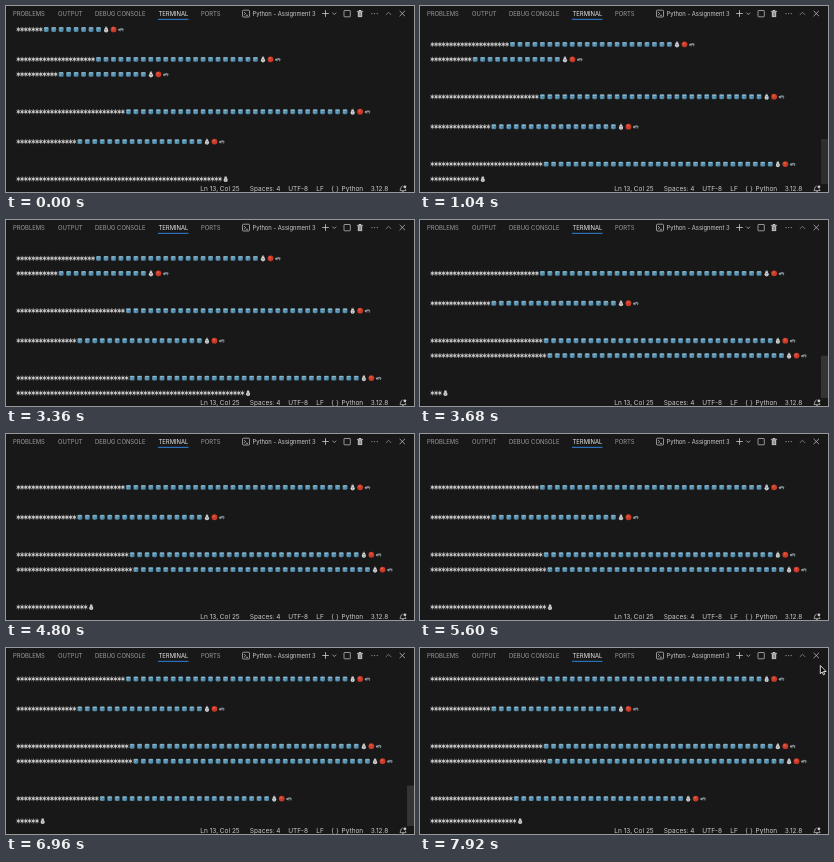
An HTML page with a canvas that plays this animation: 408 px wide and 186 px high, repeating every 8000 ms.

```html
<!DOCTYPE html>
<html lang="en">
<head>
<meta charset="utf-8">
<title>Terminal</title>
<style>
html, body { margin: 0; width: 100%; height: 100%; overflow: hidden; background: #181818; }
canvas { display: block; width: 408px; height: 186px; }
</style>
</head>
<body>
<canvas id="stage"></canvas>
<script>
const W = 408, H = 186, LOOP = 8000;
const CELL = 3.735, LINE = 7.48, LEFT = 10.5, BASE = 173;
const FG = '#cccccc', BG = '#181818';
const canvas = document.getElementById('stage');
const ctx = canvas.getContext('2d');
const scale = Math.max(1, window.devicePixelRatio || 1);
canvas.width = W * scale;
canvas.height = H * scale;

// A snowman walks 2 * flakes + 1 cells, then half the trail freezes
// and the next run begins `gap` lines further down.
const FIRST = 5, FIRST_END = 400;
const flakes = [7, 21, 11, 29, 16, 30, 31, 22, 22];
const gaps = [4, 2, 5, 4, 5, 2, 5, 3];
const pace = [67, 48, 69.5, 59]; // ms per cell, from run FIRST on

let line = 0, start = FIRST_END - (2 * flakes[FIRST] + 1) * pace[0];
const runs = flakes.map((n, i) => {
  const run = { n, line, start: -Infinity, step: pace[i - FIRST] };
  line += gaps[i];
  if (i >= FIRST) {
    run.start = start;
    start += (2 * n + 1) * run.step;
  }
  return run;
});

const clamp = v => Math.min(1, Math.max(0, v));

function dot(x, y, r, color) {
  ctx.fillStyle = color;
  ctx.beginPath();
  ctx.arc(x, y, r, 0, 7);
  ctx.fill();
}

function box(x, y, w, h, color) {
  ctx.fillStyle = color;
  ctx.fillRect(x, y, w, h);
}

function stroke(points, color = FG, width = 0.7) {
  ctx.strokeStyle = color;
  ctx.lineWidth = width;
  ctx.beginPath();
  points.forEach(([x, y]) => ctx.lineTo(x, y));
  ctx.stroke();
}

function frame(x, y, w, h, r) {
  ctx.strokeStyle = FG;
  ctx.lineWidth = 0.7;
  ctx.beginPath();
  ctx.roundRect(x, y, w, h, r);
  ctx.stroke();
}

function chevron(x, y, size, dir, color) {
  stroke([[x - size, y - dir * size / 2], [x, y + dir * size / 2], [x + size, y - dir * size / 2]], color);
}

function text(str, x, y, size, color = FG) {
  ctx.font = `${size}px Inter, "Liberation Sans", sans-serif`;
  ctx.fillStyle = color;
  ctx.fillText(str, x, y);
}

function flake(x, y) {
  for (let i = 0; i < 3; i++) {
    const a = Math.PI / 2 + i * Math.PI / 3;
    const dx = Math.cos(a) * 2.3, dy = Math.sin(a) * 2.5;
    stroke([[x - dx, y - dy], [x + dx, y + dy]], '#b4b4b4', 0.7);
  }
  dot(x, y, 1.2, '#c8c8c8');
}

function ice(x, y) {
  ctx.fillStyle = '#4f87a6';
  ctx.beginPath();
  ctx.roundRect(x - 2.6, y - 2.4, 4.9, 4.9, 1.4);
  ctx.fill();
  box(x - 2.1, y - 2, 3.9, 1.2, '#91b9cc');
  box(x - 1.7, y - 0.2, 1.7, 1.6, '#72a5c0');
}

function snowman(x, y) {
  dot(x, y + 1, 2.1, '#d2d5d6');
  dot(x, y - 1.2, 1.3, '#d8d8d8');
  box(x - 0.9, y - 3, 1.8, 1.1, '#6c7074');
  box(x - 1.2, y - 0.3, 2.4, 0.6, '#85898c');
  box(x - 0.4, y + 0.9, 0.8, 1.2, '#777c80');
}

function ball(x, y) {
  dot(x, y, 2.9, '#c93a28');
  dot(x - 0.5, y - 0.9, 1.2, '#e0573f');
}

function critter(x, y) {
  ctx.fillStyle = '#76858b';
  ctx.beginPath();
  ctx.ellipse(x + 0.4, y + 0.6, 2.4, 2, 0, Math.PI, 0);
  ctx.fill();
  dot(x - 1.9, y + 0.4, 1, '#9aa5a9');
  box(x - 1.3, y + 0.6, 0.9, 1.3, '#8b979b');
  box(x + 1.3, y + 0.6, 0.9, 1.3, '#8b979b');
}

const single = i => LEFT + (i + 0.5) * CELL;
const wide = i => LEFT + (i + 1) * CELL;

function trail(n, y) {
  for (let i = 0; i < n; i++) flake(single(i), y);
}

function frozen(n, y) {
  trail(n, y);
  for (let i = 0; i <= n; i++) ice(wide(n + 2 * i), y);
  [snowman, ball, critter].forEach((paint, i) => paint(wide(3 * n + 2 + 2 * i), y));
}

function terminal(t) {
  const now = runs.findLastIndex(r => t >= r.start);
  const run = runs[now];
  for (const r of runs.slice(0, now)) {
    const y = BASE - (run.line - r.line) * LINE;
    if (y > 19) frozen(r.n, y);
  }
  const steps = Math.floor((t - run.start) / run.step);
  trail(steps, BASE);
  snowman(wide(steps), BASE);

  // The scrollbar shows on new lines, then fades
  const age = t - run.start;
  ctx.globalAlpha = clamp(age / 100) * clamp(1 - (age - 500) / 800);
  const top = 133 + (run.line - 22) * 0.55;
  box(401, top, 7, 178 - top, '#343434');
  ctx.globalAlpha = 1;
}

function header() {
  const tabs = [['PROBLEMS', 7], ['OUTPUT', 52], ['DEBUG CONSOLE', 89], ['TERMINAL', 152.5], ['PORTS', 195]];
  for (const [name, x] of tabs) text(name, x, 9.8, 5.9, name === 'TERMINAL' ? '#e7e7e7' : '#9d9d9d');
  box(152, 12.8, 30.5, 1.2, '#2a6fb8');

  frame(236.5, 4.2, 7, 6.8, 1);
  stroke([[238, 6], [239.7, 7.6], [238, 9.2]]);
  stroke([[240, 9.3], [242, 9.3]]);
  text('Python - Assignment 3', 246.4, 9.8, 5.85);

  box(316.2, 7.1, 6.6, 0.8, FG);
  box(319.1, 4.2, 0.8, 6.6, FG);
  chevron(328.3, 7.6, 1.9, 1, FG);
  frame(338, 4.5, 6.3, 6.3, 0.5);

  box(350.9, 4.9, 6.2, 0.8, FG);
  box(352.8, 4, 2.4, 1, FG);
  box(351.8, 5.6, 4.4, 5.5, '#b8b8b8');
  box(353.8, 6.6, 0.5, 3.4, BG);

  for (let i = 0; i < 3; i++) dot(366 + i * 2.6, 7.6, 0.55, '#aaaaaa');
  chevron(382.5, 7.6, 2.7, -1, '#9d9d9d');
  stroke([[393.6, 4.8], [399, 10.2]]);
  stroke([[399, 4.8], [393.6, 10.2]]);
}

function statusBar() {
  const items = [['Ln 13, Col 25', 194.3], ['Spaces: 4', 243.8], ['UTF-8', 282.2], ['LF', 310.3],
    ['{ }', 325.3], ['Python', 335.6], ['3.12.8', 364.8]];
  for (const [label, x] of items) text(label, x, 185.1, 6.5);
  stroke([[396.6, 179.9], [395.2, 181], [394, 184.6], [400, 184.6], [399.2, 182.6]]);
  box(396.2, 185, 1.6, 0.7, FG);
  dot(398.9, 180.8, 1.4, FG);
}

function pointer(t) {
  if (t < 7200) return;
  const far = (1 - clamp((t - 7200) / 400)) ** 2;
  ctx.save();
  ctx.translate(400.3 + 7 * far, 17.5 - 3.5 * far);
  ctx.beginPath();
  [[0, 0], [0, 8.2], [1.9, 6.5], [3.1, 9.3], [4.4, 8.7], [3.2, 6], [5.8, 6]]
    .forEach(([x, y]) => ctx.lineTo(x, y));
  ctx.closePath();
  ctx.fillStyle = '#050505';
  ctx.fill();
  ctx.strokeStyle = '#f0f0f0';
  ctx.lineWidth = 0.9;
  ctx.stroke();
  ctx.restore();
}

function draw(now) {
  const t = now % LOOP;
  ctx.setTransform(scale, 0, 0, scale, 0, 0);
  box(0, 0, W, H, BG);
  terminal(t);
  header();
  statusBar();
  pointer(t);
}

let began;
function tick(now) {
  began ??= now;
  draw(now - began);
  requestAnimationFrame(tick);
}
draw(0);
requestAnimationFrame(tick);
</script>
</body>
</html>
```
